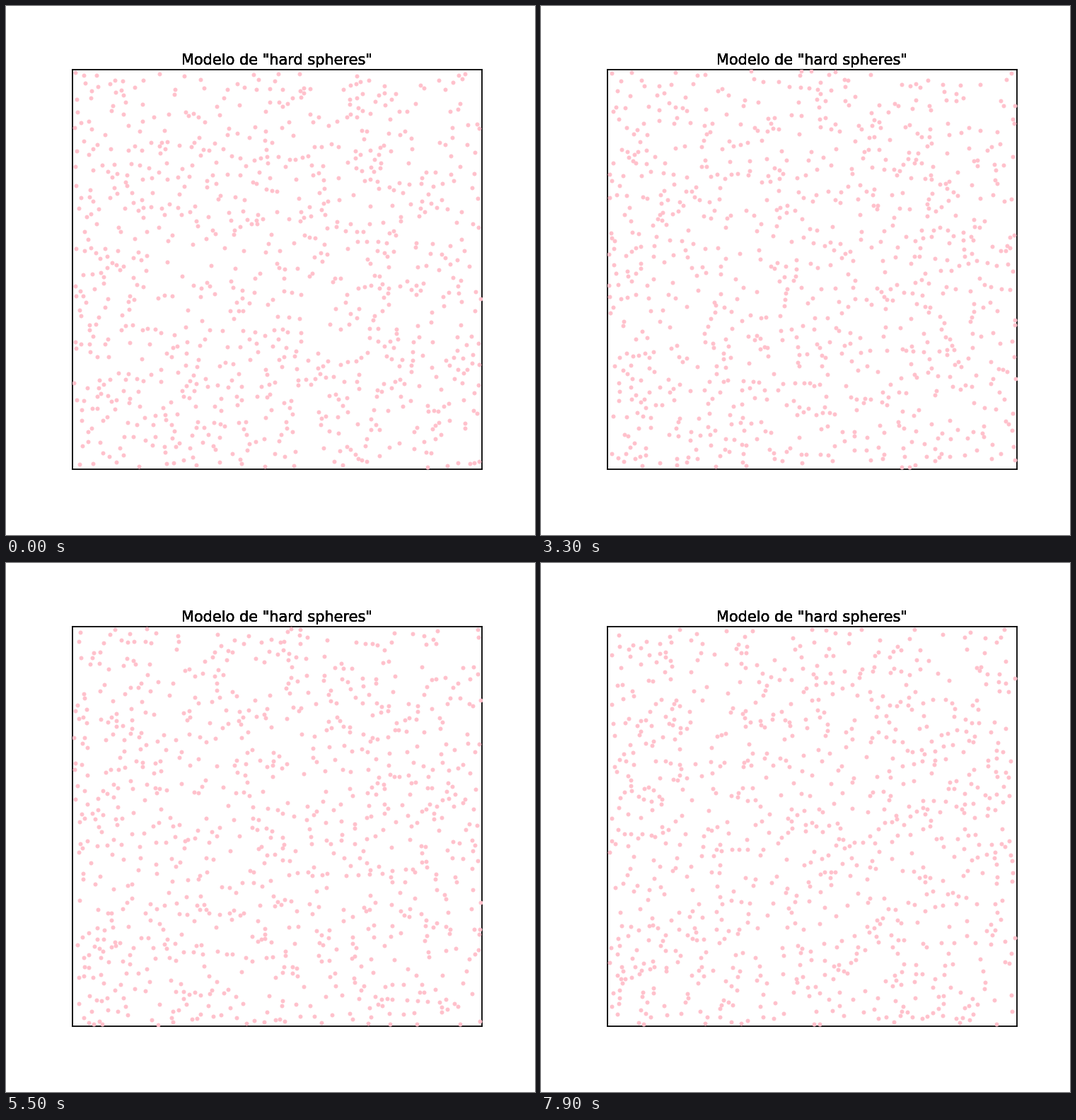
A matplotlib script for the animation above (8000 ms loop, 748 by 748 pixels).

```python
import numpy as np
import matplotlib.pyplot as plt
from matplotlib.animation import FuncAnimation

SIZE, DPI = 748, 64
PX = 72 / DPI                      # one pixel in points
LEFT, RIGHT, TOP, BOTTOM = 94, 673, 90, 655
COUNT, RADIUS, SPEED = 900, 2.8, 9
FRAMES, INTERVAL, SUBSTEPS = 80, 100, 2

LOW = np.array([LEFT, TOP]) + 2.0
HIGH = np.array([RIGHT, BOTTOM]) - 2.0
rng = np.random.default_rng(12)


def place_spheres():
    """Scatter the spheres without overlaps; the first three start almost at rest."""
    pos = [np.array(p) for p in [(98.0, 94.0), (110.0, 558.0), (99.0, 343.0)]]
    while len(pos) < COUNT:
        p = rng.uniform(LOW, HIGH)
        if np.min(np.sum((np.array(pos) - p) ** 2, axis=1)) > (2 * RADIUS) ** 2:
            pos.append(p)
    vel = rng.normal(0, SPEED, (COUNT, 2))
    vel[:3] = [(-2, -1.5), (0, 0), (0, 0)]
    return np.array(pos), vel


def collide(pos, vel):
    """Elastic collisions between equal masses."""
    dx = pos[:, None, 0] - pos[None, :, 0]
    dy = pos[:, None, 1] - pos[None, :, 1]
    for i, j in np.argwhere(dx * dx + dy * dy < (2 * RADIUS) ** 2):
        if i >= j:
            continue
        normal = pos[i] - pos[j]
        normal /= np.hypot(*normal) + 1e-9
        approach = (vel[i] - vel[j]) @ normal
        if approach < 0:
            vel[i] -= approach * normal
            vel[j] += approach * normal


def bounce(pos, vel):
    vel[:] = np.where(pos < LOW, np.abs(vel), vel)
    vel[:] = np.where(pos > HIGH, -np.abs(vel), vel)
    np.clip(pos, LOW, HIGH, out=pos)


def simulate():
    pos, vel = place_spheres()
    dt = INTERVAL / 1000 / SUBSTEPS
    track = []
    for _ in range(FRAMES):
        track.append(pos.copy())
        for _ in range(SUBSTEPS):
            pos += vel * dt
            bounce(pos, vel)
            collide(pos, vel)
    return track


track = simulate()

fig = plt.figure(figsize=(SIZE / DPI, SIZE / DPI), dpi=DPI, facecolor="white")
ax = fig.add_axes([LEFT / SIZE, 1 - BOTTOM / SIZE,
                   (RIGHT - LEFT) / SIZE, (BOTTOM - TOP) / SIZE])
ax.set(xlim=(LEFT, RIGHT), ylim=(BOTTOM, TOP), xticks=[], yticks=[])
for spine in ax.spines.values():
    spine.set_linewidth(1.8 * PX)

# Stacked copies give the title its heavy edges.
for _ in range(5):
    ax.text((LEFT + RIGHT) / 2, 83.4, 'Modelo de "hard spheres"', ha="center",
            va="baseline", family="DejaVu Sans", fontsize=20.83 * PX, color="black")

dots, = ax.plot([], [], "o", color="pink", ms=5.2 * PX, mew=0.7 * PX, zorder=3)


def update(frame):
    dots.set_data(track[frame][:, 0], track[frame][:, 1])
    return dots,


anim = FuncAnimation(fig, update, frames=FRAMES, interval=INTERVAL,
                     repeat=True, repeat_delay=0, blit=False)
plt.show()
```
